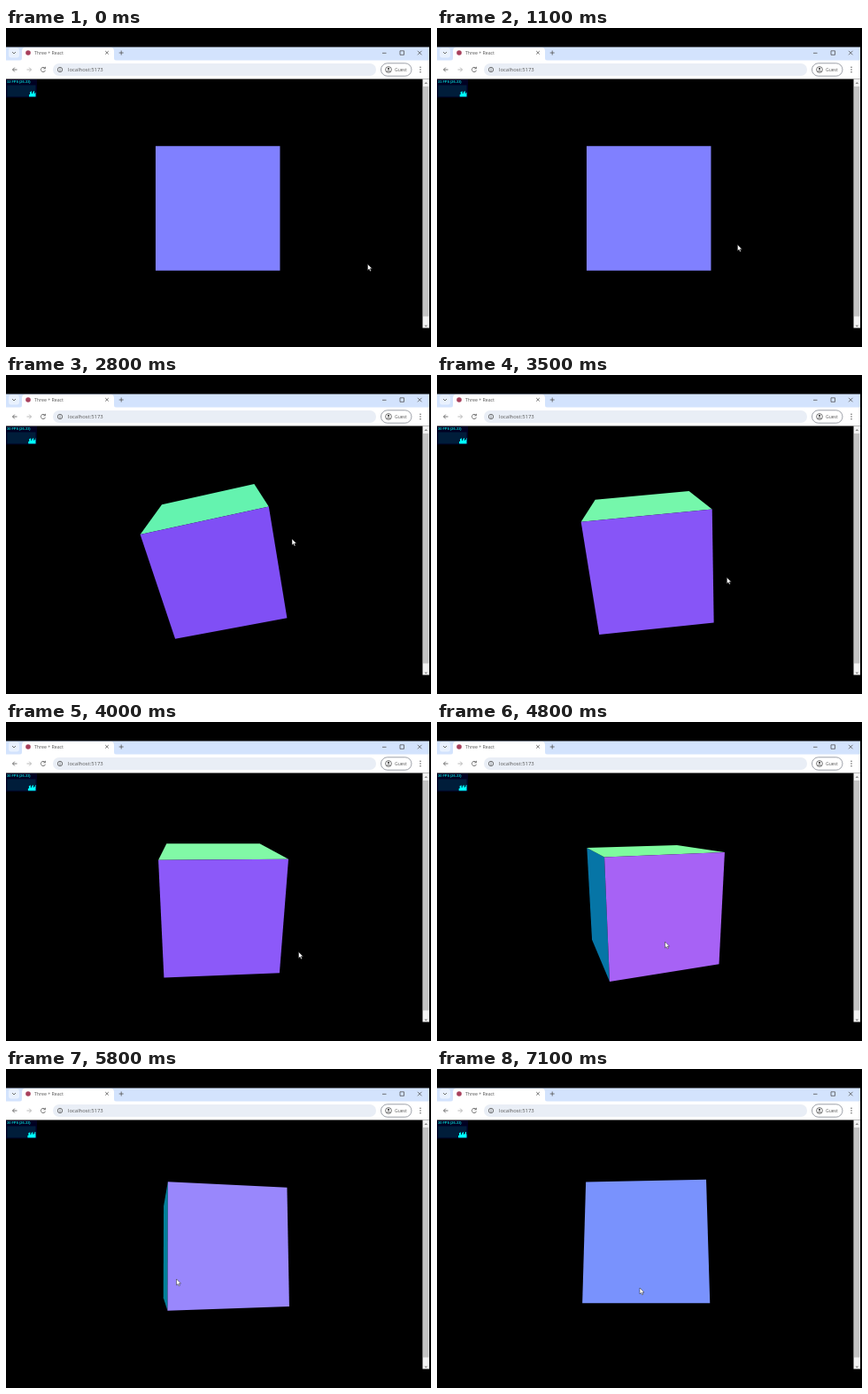
An HTML page that plays this animation: 480 px wide and 360 px high, repeating every 7.2 s.

```html
<!DOCTYPE html>
<html lang="en">
<head>
<meta charset="utf-8">
<title>Rotating cube</title>
<style>
  html, body { margin: 0; width: 100%; height: 100%; overflow: hidden; background: #000; }
  svg { display: block; width: 480px; height: 360px; }
  text { font-family: "Open Sans", sans-serif; fill: #555; }
  .line { fill: none; stroke: #555; stroke-width: .8; }
</style>
</head>
<body>
<svg viewBox="0 0 480 360">
  <!-- tab strip -->
  <rect y="21.5" width="478" height="16" fill="#d3e3fd"/>
  <rect x="3" y="22.5" width="12" height="11" rx="3" fill="#e9f1fe"/>
  <path class="line" d="M7 27l2 2 2-2"/>
  <path d="M15 37q3 0 3-3v-8q0-4 4-4h96q4 0 4 4v8q0 3 3 3z" fill="#fff"/>
  <circle cx="25" cy="28" r="2.8" fill="#a8405c"/>
  <text x="32" y="30" font-size="5.2">Three + React</text>
  <path class="line" d="M112.2 26l3.6 3.6m0-3.6l-3.6 3.6M127.7 28h5m-2.5-2.5v5"/>
  <path class="line" d="M425 28.3h4.5M445 25.8h4.5v4.5h-4.5zM465 25.8l4.5 4.5m0-4.5l-4.5 4.5"/>

  <!-- toolbar -->
  <rect y="36.5" width="478" height="21" fill="#fff"/>
  <path class="line" d="M12.5 47h-5m2.3-2.4L7.5 47l2.3 2.4"/>
  <path class="line" style="stroke:#aaa" d="M23.5 47h5m-2.3-2.4l2.3 2.4-2.3 2.4"/>
  <path class="line" d="M44 45.3a2.6 2.6 0 1 0 .5 2.4M44.4 43.8v2h-2"/>
  <rect x="53" y="40" width="365" height="14" rx="7" fill="#e9eef6"/>
  <circle class="line" cx="61" cy="47" r="2.7"/>
  <path class="line" d="M61 46.6v2M61 45.2v.6"/>
  <text x="70" y="49.2" font-size="5.9">localhost:5173</text>
  <rect class="line" x="423.5" y="39.8" width="34.5" height="14.4" rx="7.2" style="stroke:#858a94"/>
  <circle class="line" cx="432" cy="47" r="3.4"/>
  <circle cx="432" cy="46" r="1.2" fill="#555"/>
  <path class="line" d="M429.8 49.2q2.2-1.6 4.4 0"/>
  <text x="439" y="48.8" font-size="5">Guest</text>
  <path class="line" style="stroke-width:1.5;stroke-linecap:round" d="M468 44.2v.01M468 47v.01M468 49.8v.01"/>

  <!-- scrollbar -->
  <rect x="470.5" y="57.5" width="7.5" height="281" fill="#f3f3f3"/>
  <rect x="471" y="66" width="6.5" height="259.5" fill="#c3c3c3"/>
  <path d="M472.5 63l1.8-2 1.8 2zM472.5 335.5l1.8 2 1.8-2z" fill="#888"/>

  <!-- frame rate panel -->
  <rect y="58" width="35" height="20.5" fill="#002"/>
  <rect x="1.3" y="64.5" width="32.2" height="13" fill="#001d3a"/>
  <text id="fps" x="1" y="62.2" style="font:bold 3.9px 'Liberation Sans',sans-serif;fill:#0cc"></text>
  <path id="graph" fill="#0ff"/>

  <g id="cube"></g>
  <path id="cursor" d="M0 0v7l1.6-1.5 1.1 2.4 1.2-.5-1.1-2.3h2.2z" fill="#fff" stroke="#222" stroke-width=".5"/>
</svg>
<script>
const LOOP = 7200, STEP = 100;
const CENTER_X = 239.2, CENTER_Y = 203.5, FOCAL = 351.25, DISTANCE = 6;
const $ = id => document.getElementById(id);

// Key moments of the drag: yaw, pitch and roll of the cube, and the pointer.
const moments = [
  { at: 0, turn: [0, 0, 0], mouse: [408.5, 266.5] },
  { at: 400, turn: [0, 0, 0], mouse: [408.5, 266.5] },
  { at: 1500, turn: [0, 0, 0], mouse: [300, 232] },
  { at: 1900, turn: [.4, -.1, -.045], mouse: [291, 228.5] },
  { at: 2800, turn: [0, .39, .22], mouse: [323, 185] },
  { at: 4000, turn: [.1, .305, .02], mouse: [330.5, 259.5] },
  { at: 4800, turn: [.325, .23, .085], mouse: [257.5, 248] },
  { at: 5800, turn: [.205, -.055, -.005], mouse: [192.5, 237] },
  { at: 6700, turn: [-.055, -.148, .01], mouse: [229, 247] }
];

function sample(part, t) {
  const next = moments.findIndex(m => m.at > t);
  if (next < 0) return moments.at(-1)[part];
  const from = moments[next - 1], to = moments[next];
  const p = (t - from.at) / (to.at - from.at);
  return from[part].map((v, i) => v + (to[part][i] - v) * p);
}

function rotate([x, y, z], [yaw, pitch, roll]) {
  const spin = (a, b, angle) => [
    a * Math.cos(angle) - b * Math.sin(angle),
    a * Math.sin(angle) + b * Math.cos(angle)
  ];
  [x, y] = spin(x, y, roll);
  [y, z] = spin(y, z, pitch);
  [z, x] = spin(z, x, yaw);
  return [x, y, z];
}

function project([x, y, z]) {
  const scale = FOCAL / (DISTANCE - z);
  return (CENTER_X + x * scale).toFixed(2) + ',' + (CENTER_Y - y * scale).toFixed(2);
}

// Each visible face is tinted by its normal in view space.
function drawCube(angles) {
  const axes = [[1, 0, 0], [0, 1, 0], [0, 0, 1]].map(v => rotate(v, angles));
  let faces = '';
  for (let i = 0; i < 3; i++) for (const sign of [-1, 1]) {
    const normal = axes[i].map(v => v * sign);
    if (normal[2] * DISTANCE <= 1) continue;
    const u = axes[(i + 1) % 3], v = axes[(i + 2) % 3];
    const points = [[-1, -1], [1, -1], [1, 1], [-1, 1]].map(
      ([a, b]) => project(normal.map((n, k) => n + a * u[k] + b * v[k])));
    const color = normal.map(n => Math.round(127.5 * (n + 1)));
    faces += `<polygon points="${points.join(' ')}" fill="rgb(${color})"/>`;
  }
  $('cube').innerHTML = faces;
}

// The rate settles at 30 while its history slides to the left.
function drawStats(t) {
  $('fps').textContent = Math.max(30, 32 - Math.floor(t / 1000)) + ' FPS (26-33)';
  const left = 26 - t / 3600;
  let d = `M${left} 77.5`;
  for (let x = left, i = 0; x < 33.5; x++, i++) {
    const y = 72.5 + 1.5 * Math.cos(i * 2) + (i === 0);
    d += `V${y.toFixed(1)}H${Math.min(x + 1, 33.5)}`;
  }
  $('graph').setAttribute('d', d + 'V77.5z');
}

function draw(elapsed) {
  const t = Math.floor(elapsed % LOOP / STEP) * STEP;
  drawCube(sample('turn', t));
  drawStats(t);
  $('cursor').setAttribute('transform', `translate(${sample('mouse', t)})`);
}

const start = performance.now();
function tick() {
  draw(performance.now() - start);
  requestAnimationFrame(tick);
}
tick();
</script>
</body>
</html>
```
